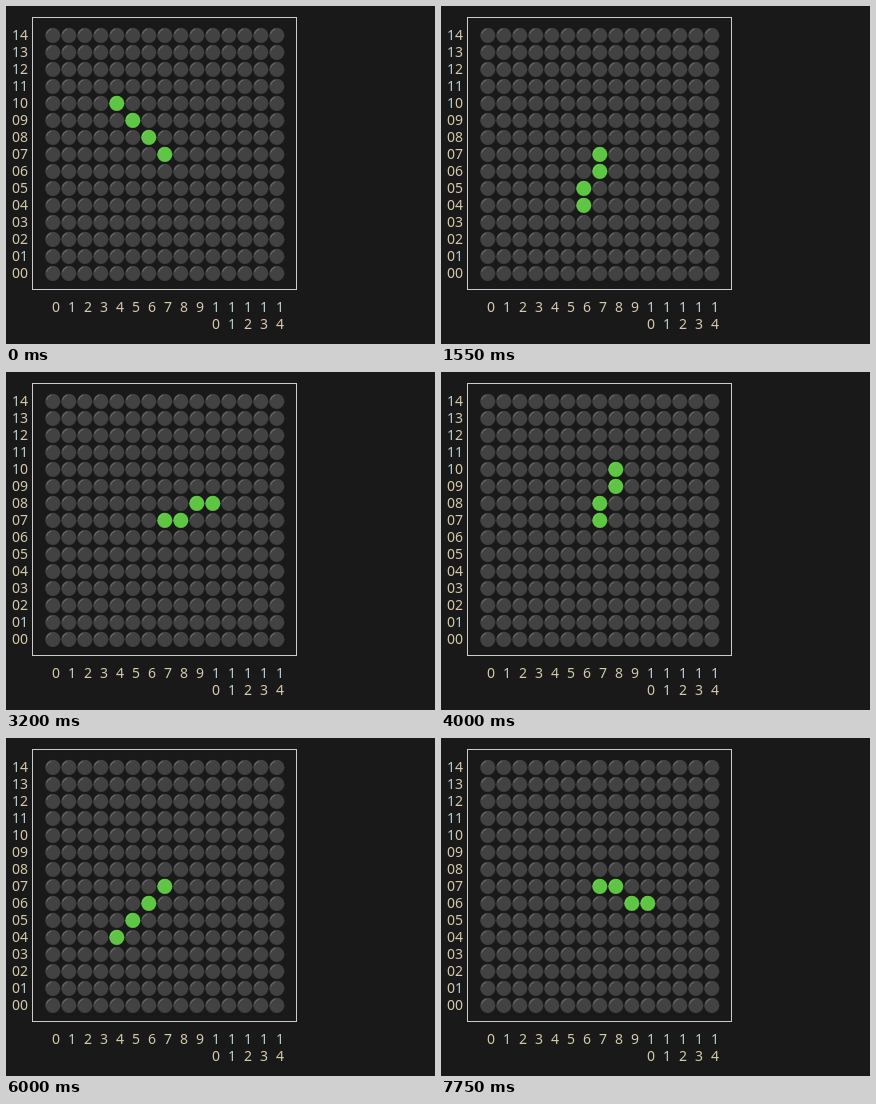
An HTML page for the animation above (8 s loop, 429 by 338 pixels).

```html
<!DOCTYPE html>
<html lang="en">
<head>
<meta charset="utf-8">
<title>Dot matrix hand</title>
<style>
  html, body { margin: 0; width: 100%; height: 100%; overflow: hidden; background: #191919; }
  svg { display: block; }
  text { font: 14px "Noto Sans", "Open Sans", sans-serif; text-anchor: middle; fill: #d6c9ac; }
  .one { fill: #b9d0d2; }
  .dot { fill: #424242; }
  .shine { fill: none; stroke: #6c6c6c; stroke-width: 1.1; stroke-linecap: round; }
  .lit .dot { fill: #5fc544; }
  .lit .shine { stroke: #72d056; }
</style>
</head>
<body>
<svg width="429" height="338" viewBox="0 0 429 338">
  <rect x="26.5" y="11.5" width="264" height="272" fill="none" stroke="#ccc"/>
</svg>
<script>
const SIZE = 15, CENTER = 7, REACH = 3;
const CELL_W = 16, CELL_H = 17;
const LOOP = 8000;
// How long the hand rests in each position, in ms.
const HOLDS = [
  150, 200, 200, 150, 200, 200, 200, 250, 250, 200, 200, 200, 200,
  ...Array(18).fill(200),
  200, 200, 250, 200, 200, 200, 150, 200, 250
];
// The last hold takes up whatever remains of the loop.
const svg = document.querySelector("svg");

function add(parent, tag, attrs) {
  const el = document.createElementNS("http://www.w3.org/2000/svg", tag);
  for (const key in attrs) el.setAttribute(key, attrs[key]);
  return parent.appendChild(el);
}

function digit(char, x, y) {
  add(svg, "text", { x, y, class: char === "1" ? "one" : "" }).textContent = char;
}

function makeDot(col, row) {
  const x = 46.8 + col * CELL_W;
  const y = 29.3 + (SIZE - 1 - row) * CELL_H;
  const g = add(svg, "g", { transform: `translate(${x} ${y})` });
  add(g, "circle", { class: "dot", r: 7.6 });
  add(g, "path", { class: "shine", d: "M-6.1 -1.9A6.4 6.4 0 0 1 -1.9 -6.1" });
  return g;
}

const dots = [];
for (let i = 0; i < SIZE; i++) {
  const y = 34 + (SIZE - 1 - i) * CELL_H;
  [...String(i).padStart(2, "0")].forEach((c, k) => digit(c, 10 + 8 * k, y));
  [...String(i)].forEach((c, k) => digit(c, 50 + CELL_W * i, 306 + CELL_H * k));
  dots.push(Array.from({ length: SIZE }, (_, row) => makeDot(i, row)));
}

// Tip of the hand, walking counterclockwise round a square from the top left.
function tip(step) {
  const side = Math.floor(step / (2 * REACH)) % 4;
  const along = step % (2 * REACH) - REACH;
  return [[-REACH, -along], [along, -REACH], [REACH, along], [-along, REACH]][side];
}

function hand(step) {
  const [dx, dy] = tip(step);
  return Array.from({ length: REACH + 1 }, (_, k) =>
    dots[CENTER + Math.round(dx * k / REACH)][CENTER + Math.round(dy * k / REACH)]);
}

function stepAt(time) {
  let step = 0;
  while (step < HOLDS.length - 1 && time >= HOLDS[step]) time -= HOLDS[step++];
  return step;
}

let shown = -1, lit = [];
function draw() {
  const step = stepAt(performance.now() % LOOP);
  if (step !== shown) {
    lit.forEach(dot => dot.classList.remove("lit"));
    lit = hand(step);
    lit.forEach(dot => dot.classList.add("lit"));
    shown = step;
  }
  requestAnimationFrame(draw);
}
draw();
</script>
</body>
</html>
```
